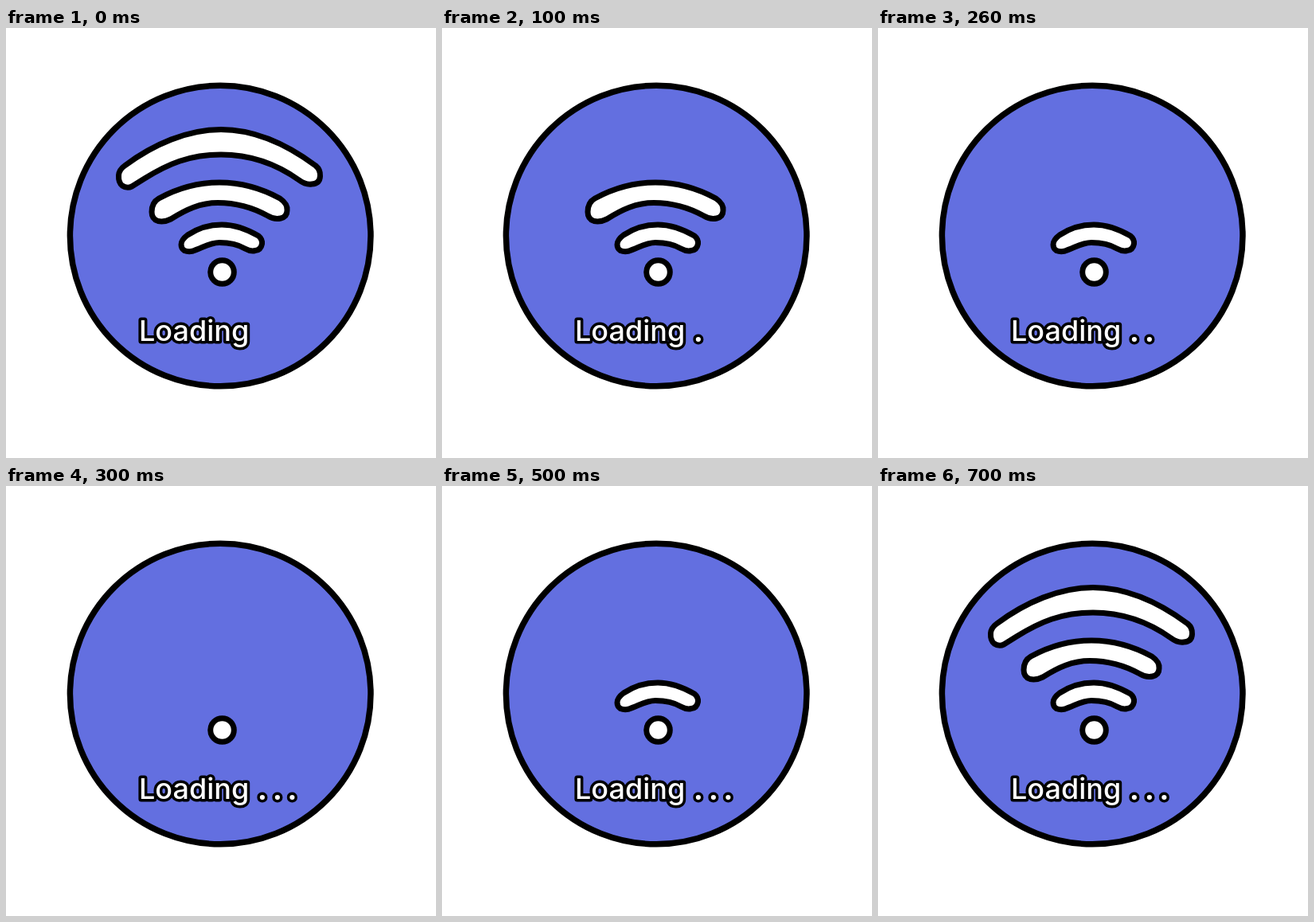
These frames come from a looping animation (540x540 px, 800 ms). An HTML page:

```html
<!DOCTYPE html>
<html lang="en">
<head>
<meta charset="utf-8">
<title>Loading</title>
<style>
  html, body { margin: 0; width: 100%; height: 100%; overflow: hidden; background: #fff; }
  svg { display: block; width: 100vw; height: 100vh; }
  .shape { fill: #fff; stroke: #000; stroke-width: 7; stroke-linejoin: round; }
  text {
    font: 500 36px Inter, "Noto Sans", sans-serif;
    fill: #fff; stroke: #000; stroke-width: 7; stroke-linejoin: round; paint-order: stroke;
  }
  .dot { font: 700 36px "Noto Sans", sans-serif; text-anchor: middle; }

  .blink { animation: .8s step-end infinite; }
  .large { animation-name: large; }
  .medium { animation-name: medium; }
  .small { animation-name: small; }
  .dot1 { animation-name: dot1; }
  .dot2 { animation-name: dot2; }
  .dot3 { animation-name: dot3; }

  @keyframes large { 0%, 87.5% { opacity: 1 } 12.5% { opacity: 0 } }
  @keyframes medium { 0%, 75% { opacity: 1 } 25% { opacity: 0 } }
  @keyframes small { 0%, 62.5% { opacity: 1 } 37.5% { opacity: 0 } }
  @keyframes dot1 { 0% { opacity: 0 } 12.5%, 100% { opacity: 1 } }
  @keyframes dot2 { 0% { opacity: 0 } 25%, 100% { opacity: 1 } }
  @keyframes dot3 { 0% { opacity: 0 } 37.5%, 100% { opacity: 1 } }
</style>
</head>
<body>
<svg viewBox="0 0 540 540">
  <circle cx="269.2" cy="261" r="188.8" fill="#636fe0" stroke="#000" stroke-width="7.5"/>

  <path class="shape blink large" d="M141.5 185 Q142 178 149 173 C185 146 228 127.500 270 127.500
    C313 127.500 354 147 389 173 Q395 178 394.500 186 Q394 195.500 384 196 Q376 197 368 191
    C340 171 308 159 270 159 C230 159 203 171 174 189 L158 199 Q152 202 146 198 Q141 194 141.500 185 Z"/>
  <path class="shape blink medium" d="M183 231 Q183 219 192 214 C214 202 240 194 268 194
    C296 194 322 202 344 214 Q354 221 353 229 Q353 237 345 239 Q337 241 329 236
    C309 225 288 219.500 266 219.500 C244 219.500 226 228 207 240 Q199 244 191 242.500 Q183 240 183 231 Z"/>
  <path class="shape blink small" d="M220 272 Q220 266 228 260 C240 252 255 247 271 247
    C287 247 303 253 317 261 Q322 265 321.500 271 Q320 279 313 279.500 Q307 281 300 277
    C290 271 280 269.500 268 269.500 C256 269.500 247 276 235 280 Q229 281.500 224 279.500 Q220 277 220 272 Z"/>
  <circle class="shape" cx="271.500" cy="306.500" r="14.800"/>

  <text x="167" y="393">Loading</text>
  <text class="dot blink dot1" x="322" y="393.500">.</text>
  <text class="dot blink dot2" x="341" y="393.500">.</text>
  <text class="dot blink dot3" x="359.500" y="393.500">.</text>
</svg>
</body>
</html>
```
